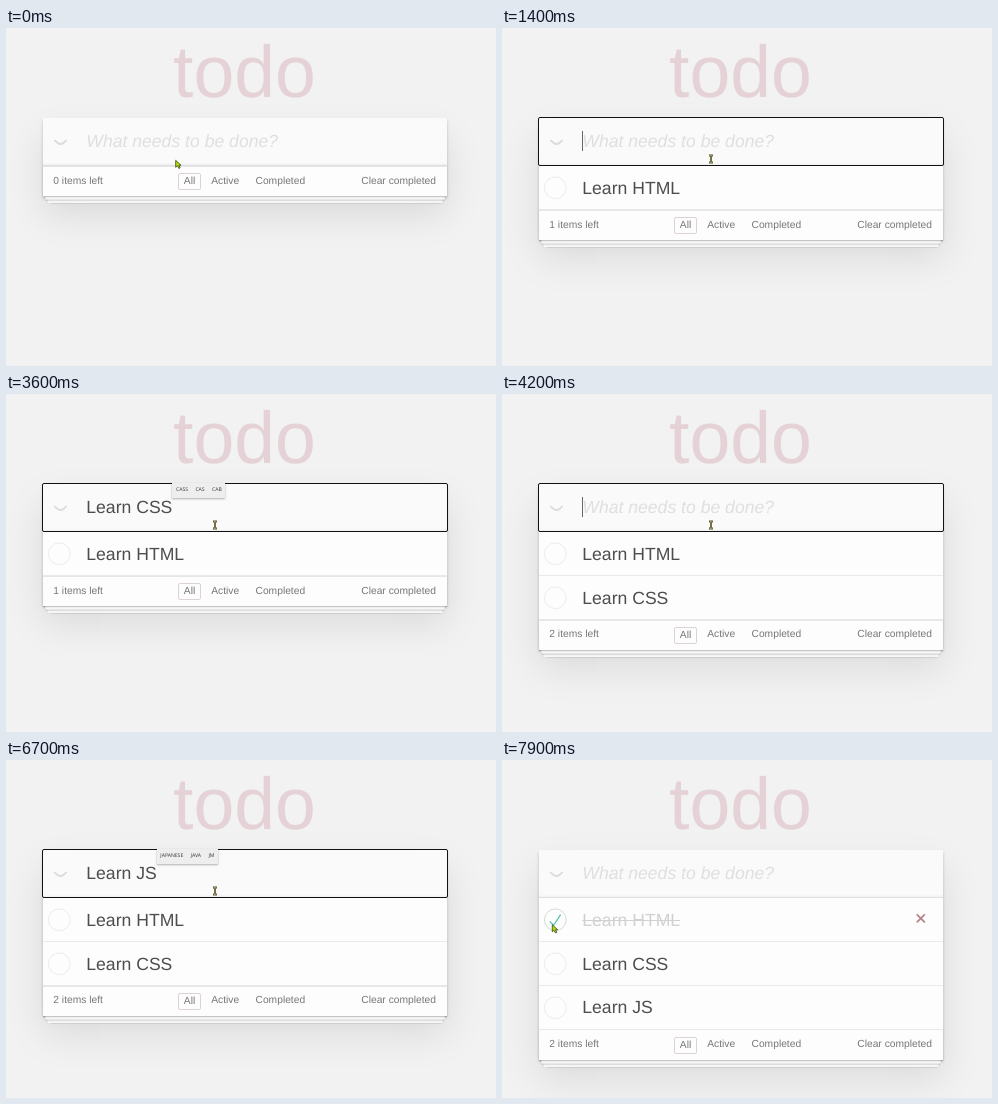
These frames come from a looping animation (490x338 px, 8000 ms). An HTML page:

```html
<!DOCTYPE html>
<html lang="en">
<head>
<meta charset="utf-8">
<title>todo</title>
<style>
  html, body { margin: 0; width: 490px; height: 338px; overflow: hidden; background: #f2f2f3; }
  body { position: relative; font: 10.28px "Liberation Sans", Arial, sans-serif; color: #777; text-rendering: geometricPrecision; }
  body *, .row { position: absolute; box-sizing: border-box; white-space: pre; }
  h1 { margin: 0; left: 0; width: 477px; top: 4px; line-height: 80px; text-align: center; font-size: 73.4px; font-weight: 400; color: #e5d2d6; }
  #card { left: 37px; top: 89.5px; width: 404px; background: #fdfdfd; box-shadow: 0 1.5px 3px rgba(0,0,0,.2), 0 18px 37px rgba(0,0,0,.1); }
  #field { left: 37px; top: 89.5px; width: 404px; height: 48.5px; background: #fafafa; border-bottom: 1px solid #e0e0e0; box-shadow: inset 0 -1.5px 1px rgba(0,0,0,.03); }
  #focus { left: 35.8px; top: 88.8px; width: 406px; height: 48.8px; border: 1.5px solid #111; border-radius: 2px; }
  #line, .row span { left: 80.3px; font-size: 17.6px; line-height: 24px; color: #4d4d4d; }
  #line { top: 101.3px; }
  #line > span { position: static; }
  #typed.empty { font-style: italic; color: #dfdfdf; }
  #end { display: inline-block; position: relative !important; width: 0; height: 20px; vertical-align: middle; }
  #caret { left: 0; top: 0; width: 1px; height: 20px; background: #666; }
  #home { left: 80.3px; top: 103px; width: 1px; height: 20px; background: #666; }
  #pop { top: 88.8px; height: 15.2px; padding: 0 3.6px; background: #eee; box-shadow: 0 .5px 2px rgba(0,0,0,.3); font: 5.1px/15px "Open Sans", "Noto Sans", sans-serif; color: #333; }
  #pop b { position: static; font-weight: 400; margin-right: 7.4px; }
  #pop b:last-child { margin: 0; }
  .row { left: 0; width: 490px; height: 43.8px; }
  .row span { top: 9.6px; }
  .row hr { left: 37px; width: 404px; bottom: 0; height: 1px; margin: 0; border: 0; background: #e9e9e9; }
  svg { left: 0; top: 0; overflow: visible; fill: none; }
  #foot { left: 37px; width: 404px; height: 30.2px; line-height: 30px; border-top: 1px solid #e6e6e6; background: #fdfdfd;
    box-shadow: 0 1px 1px rgba(0,0,0,.2), 0 5.9px 0 -2.2px #f6f6f6, 0 6.6px 1px -2.2px rgba(0,0,0,.2), 0 11.8px 0 -4.4px #f6f6f6, 0 12.5px 1.5px -4.4px rgba(0,0,0,.2); }
  #foot span { top: -.3px; }
  #foot #all { left: 135px; top: 6.2px; width: 23px; height: 17px; line-height: 15.6px; text-align: center; border: 1px solid #ddd3d4; border-radius: 2px; }
</style>
</head>
<body>
<h1>todo</h1>
<div id="card"></div>
<div id="foot">
  <span id="count" style="left:10.3px"></span><span id="all">All</span>
  <span style="left:168.2px">Active</span><span style="left:212.5px">Completed</span>
  <span style="right:11px">Clear completed</span>
</div>
<div id="rows"></div>
<div id="field"></div>
<svg width="490" height="338"><path d="M48.5 112q3 3.8 6 4.3q3-.5 6-4.3" stroke="#dcdcdc" stroke-width="2"/></svg>
<div id="line"><span id="typed"></span><span id="end"><i id="caret"></i></span></div>
<i id="home"></i>
<div id="focus"></div>
<div id="pop"></div>
<svg width="490" height="338">
  <path id="arrow" d="M0 0V7L1.8 5.5 3.2 8.2 4.5 7.5 3.2 5H5.4Z" fill="#b4e000" stroke="#3c4420" stroke-width=".8"/>
  <g id="beam"><path d="M-2-3.5H2M0-3.5V3.5M-2 3.5H2" stroke="#4a4a30" stroke-width="1.9"/><path d="M-1.6-3.5H1.6M0-3.5V3.5M-1.6 3.5H1.6" stroke="#c9c070" stroke-width=".6"/></g>
</svg>
<script>
const $ = id => document.getElementById(id);
const LOOP = 8000, STEP = 100, PITCH = 43.83, CLICK = 7500;

// [time, typed text, suggestions]; a trailing | is the caret
const typing = [
  [0, ''], [100, '|'], [400, 'L|'], [500, 'Le|'], [600, 'Lea|'], [700, 'Lear|'], [800, 'Learn |'],
  [900, 'Learn H|'], [1000, 'Learn HT|'], [1100, 'Learn HTM|'], [1200, 'Learn HTML|'],
  [1300, '|'], [1800, ''], [2000, 'L|'], [2200, 'Le|'], [2300, 'Lea|'], [2400, 'Lear|'],
  [2500, 'Learn |'], [2600, 'Learn H|'], [2700, 'Learn |'], [2800, 'Lear|'],
  [3000, 'Learn |', 'how,how to,more'], [3100, 'Learn C|'], [3200, 'Learn C|', 'CHESS,CODING,CAD'],
  [3300, 'Learn CS|'], [3400, 'Learn CS|', 'CASES,CAST,CSV'], [3500, 'Learn CSS|'],
  [3600, 'Learn CSS', 'CASS,CAS,CAB'], [3800, '|'], [4300, ''], [4500, 'L|'], [4700, 'Le|'],
  [4800, 'Lea|'], [5000, 'Lear|'], [5300, 'Learn |', 'how,how to,more'], [5500, 'Learn J|'],
  [5700, 'Learn J|', 'JAPANESE,JAVA,JUST'], [6200, 'Learn JS|'], [6500, 'Learn JS', 'JAPANESE,JAVA,JM'],
  [6800, '|'], [7000, '']
];
const items = [[1300, 'Learn HTML'], [3800, 'Learn CSS'], [6800, 'Learn JS']];
const path = [[0, 169.7, 132.3], [100, 188, 130], [200, 206, 135], [400, 209, 131], [7100, 209, 131], [7500, 50.3, 164.8], [8000, 50.3, 164.8]];

$('rows').innerHTML = items.map(([, name], i) => `<div class="row" style="top:${138.2 + i * PITCH}px">
  <svg width="490" height="44"><circle cx="53.3" cy="21.8" r="10.9" stroke="#ececec"/>
  <path class="check" transform="translate(42.4 10.9) scale(.2176)" d="M72 25L42 71 27 56l-4 4 20 20 34-52z" fill="#5dc2af"/>
  <path class="cross" d="M414.8 16.4l8 8m0-8l-8 8" stroke="#b58289" stroke-width="1.7"/></svg>
  <span>${name}</span><hr></div>`).join('');
const rows = [...document.querySelectorAll('.row')];

const show = (el, on) => { el.style.display = on ? '' : 'none'; };

function pointer(t) {
  const i = path.findIndex(p => p[0] > t);
  const [t0, x0, y0] = path[i - 1], [t1, x1, y1] = path[i];
  const u = (t - t0) / (t1 - t0), k = u * u * (3 - 2 * u);
  return [x0 + (x1 - x0) * k, y0 + (y1 - y0) * k];
}

function draw(t) {
  const [, raw, words] = typing.findLast(s => s[0] <= t);
  const text = raw.replace('|', ''), caret = raw.endsWith('|');
  $('typed').textContent = text || 'What needs to be done?';
  $('typed').className = text ? '' : 'empty';
  show($('caret'), caret && text);
  show($('home'), caret && !text);
  show($('focus'), t >= 100 && t < CLICK);
  show($('pop'), words);
  if (words) {
    $('pop').innerHTML = words.split(',').map(w => `<b>${w}</b>`).join('');
    $('pop').style.left = $('end').getBoundingClientRect().left + 'px';
  }

  const total = items.filter(i => i[0] <= t).length, done = t >= CLICK;
  const [x, y] = pointer(t);
  const hovered = Math.floor((y - 138.2) / PITCH);
  rows.forEach((row, i) => {
    const checked = done && i === 0, label = row.querySelector('span');
    show(row, i < total);
    show(row.querySelector('.check'), checked);
    show(row.querySelector('.cross'), i === hovered);
    row.querySelector('circle').setAttribute('stroke', checked ? '#d3dcda' : '#ececec');
    const grey = checked ? 77 + 132 * Math.min(1, (t - CLICK) / 400) : 77;
    label.style.color = `rgb(${grey},${grey},${grey})`;
    label.style.textDecoration = checked ? 'line-through' : 'none';
  });
  $('card').style.height = 79 + total * PITCH + 'px';
  $('foot').style.top = 138 + total * PITCH + 'px';
  $('count').textContent = `${total - done} items left`;

  const overField = t >= 100 && y < 138;
  show($('arrow'), !overField);
  show($('beam'), overField);
  for (const id of ['arrow', 'beam']) $(id).setAttribute('transform', `translate(${x} ${y})`);
}

function tick() {
  draw(Math.floor(performance.now() % LOOP / STEP) * STEP);
  requestAnimationFrame(tick);
}
tick();
</script>
</body>
</html>
```
